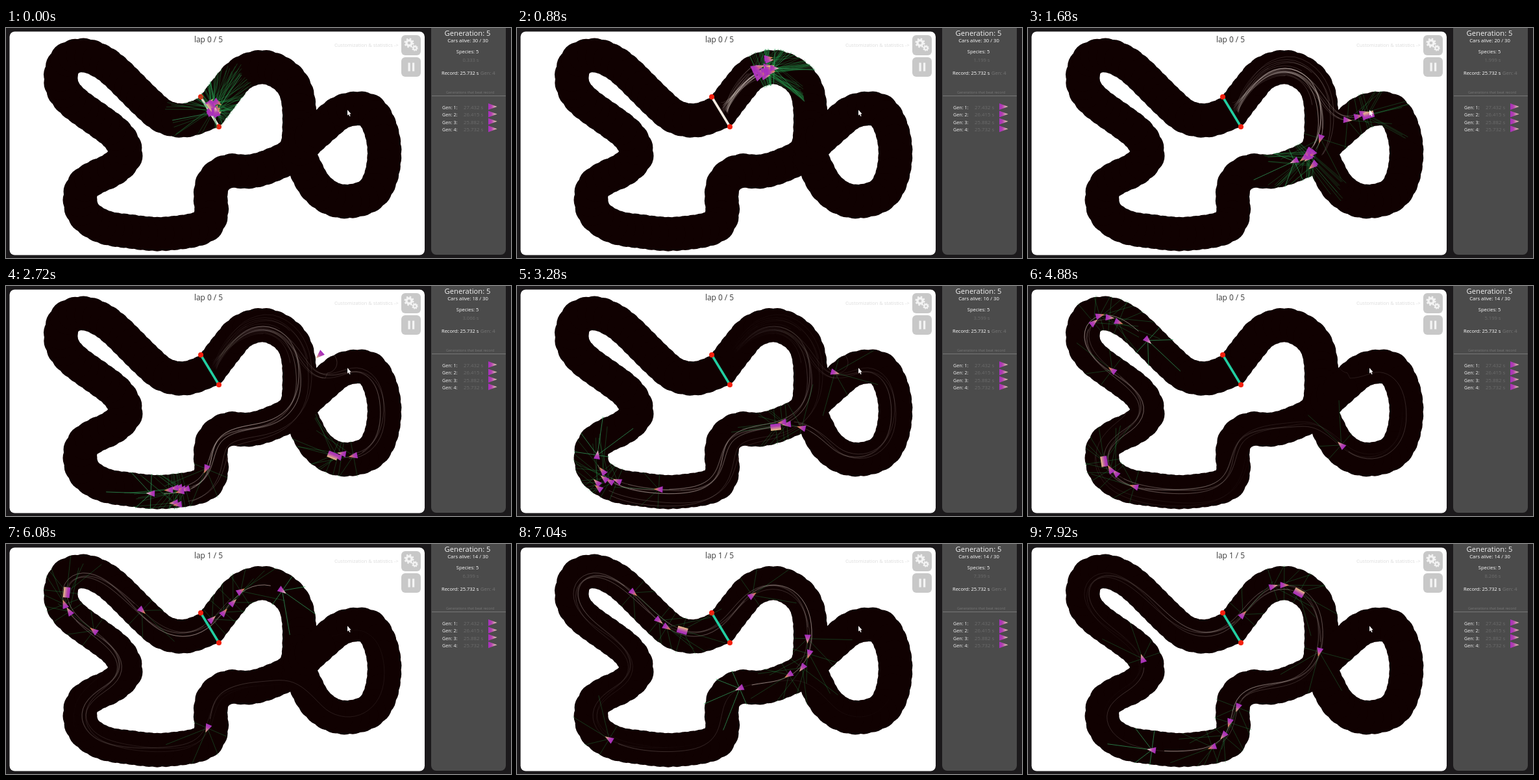
Recreate the animation shown at these times as an HTML page with a canvas. Size 778x354 px, loop 8 s.

```html
<!DOCTYPE html>
<html lang="en">
<head>
<meta charset="utf-8">
<title>Evolving cars</title>
<style>
html, body { margin: 0; width: 100%; height: 100%; overflow: hidden; background: #1b191b; }
canvas { display: block; }
</style>
</head>
<body>
<canvas id="stage" width="778" height="354"></canvas>
<script>
const g = document.getElementById('stage').getContext('2d');
const LOOP = 8000, STEP = 80, ROAD = 26, TAU = Math.PI * 2;
const LAP_TIME = 5070, TRAIL = 2800;
const rnd = n => { const v = Math.sin(n * 127.1 + 3.7) * 43758.5453; return v - Math.floor(v); };
const points = str => str.split(' ').map(p => p.split(',').map(Number));

// Road centre: the lap from the finish line, and the loop at the right
const lap = points('314,129 340,95 363,70 397,60 430,74 448,101 452,148 445,190 410,211 375,221 343,220 ' +
  '321,234 315,257 316,288 300,308 240,317 190,313 150,306 122,288 114,265 119,243 140,229 165,217 ' +
  '184,197 178,174 160,155 105,115 87,92 85,68 95,48 118,42 140,48 167,66 219,117 245,137 278,142');
const loop = points('490,150 515,130 540,124 562,129 577,155 583,190 578,228 563,255 535,266 505,264 ' +
  '478,245 461,215 452,188');

// Spline through p, resampled to one point per pixel
function spline(p) {
  const out = [];
  let len = 0, last = p[0];
  for (let i = 0; i < p.length - 1; i++) {
    const a = p[Math.max(0, i - 1)], b = p[i], c = p[i + 1], d = p[Math.min(p.length - 1, i + 2)];
    for (let t = 0; t < 1; t += 0.01) {
      const q = [0, 1].map(j => b[j] + 0.5 * t * (c[j] - a[j] + t * (2 * a[j] - 5 * b[j] + 4 * c[j] - d[j]
        + t * (3 * (b[j] - c[j]) + d[j] - a[j]))));
      len += Math.hypot(q[0] - last[0], q[1] - last[1]);
      last = q;
      while (out.length <= len) out.push(q);
    }
  }
  return out;
}
const clampAt = (p, i) => p[Math.max(0, Math.min(p.length - 1, Math.round(i)))];

// Averaging the road centre cuts the corners like a racing line
function racingLine(p, reach = 40) {
  return p.map((_, i) => {
    let x = 0, y = 0, n = 0;
    for (let k = -reach; k <= reach; k += 4, n++) {
      const q = clampAt(p, i + k);
      x += q[0];
      y += q[1];
    }
    return [x / n, y / n];
  });
}

const lapRoad = spline([...lap, lap[0]]);
const discs = [...lapRoad, ...spline([...loop, loop[0]])].filter((_, i) => i % 13 === 0);
const onRoad = (x, y) => discs.some(d => (d[0] - x) ** 2 + (d[1] - y) ** 2 < ROAD * ROAD);
const short = racingLine(spline([...lap, ...lap]));
const long = racingLine(spline([...lap.slice(0, 6), ...loop.slice(0, -1), ...lap.slice(8), ...lap]));

// speed 1 is the leader; a car that spins circles once on the spot
const SPIN = { from: 1680, span: 1650, r: 16 };
const cars = [
  ...[1, 0.95, 0.935, 0.92, 0.905, 0.81].map((speed, i) => ({ route: short, speed, lead: i === 0 })),
  ...[0.93, 0.915, 0.905, 0.87].map((speed, i) => ({ route: long, speed, box: i === 0 })),
  { route: long, speed: 0.8, spins: true }
];
for (let i = 0; i < 16; i++) {
  const early = i < 10;
  cars.push({
    route: early && i % 3 === 0 ? long : short,
    speed: early ? 0.75 + 0.2 * rnd(i) : 0.9 + 0.008 * (i - 10),
    off: early ? (rnd(i + 20) - 0.4) * 28 : i > 13 ? 19 : 0,
    death: early ? 900 + 75 * i : 2100 + 350 * (i - 10)
  });
}
cars.forEach((c, i) => { c.seed = i; c.off ??= 0; c.death ??= Infinity; });

function travelled(c, t) {
  if (c.spins) t -= Math.max(0, Math.min(SPIN.span, t - SPIN.from));
  const warm = 860;
  const run = t < warm ? t * t / (2 * warm) : t - warm / 2;
  return c.speed * lapRoad.length * run / LAP_TIME;
}

function pose(c, t) {
  const s = travelled(c, t), [x, y] = clampAt(c.route, s);
  const a = clampAt(c.route, s - 4), b = clampAt(c.route, s + 4);
  const settle = Math.max(0, 1 - t / 800);
  let dir = Math.atan2(b[1] - a[1], b[0] - a[0]);
  let side = (c.off + 4 * Math.sin(s / 70 + c.seed * 2)) * Math.min(1, s / 120), ahead = 0;
  const turn = (t - SPIN.from) / SPIN.span * TAU;
  const spinning = c.spins && turn > 0 && turn < TAU;
  if (spinning) {
    side -= SPIN.r * (1 - Math.cos(turn));
    ahead = SPIN.r * Math.sin(turn);
  }
  // side is positive to the left when heading left means downwards
  const left = spinning ? -side : side;
  const pos = {
    x: x + Math.sin(dir) * left + Math.cos(dir) * ahead + (rnd(c.seed + 60) - 0.5) * 13 * settle,
    y: y - Math.cos(dir) * left + Math.sin(dir) * ahead + (rnd(c.seed + 90) - 0.35) * 18 * settle
  };
  if (spinning) dir -= turn;
  return { ...pos, dir: dir + (rnd(c.seed + 120) - 0.5) * 3 * settle };
}

function round(x, y, w, h, r, color) {
  g.fillStyle = color;
  g.beginPath();
  g.roundRect(x, y, w, h, r);
  g.fill();
}
function dot(x, y, r, color) {
  g.fillStyle = color;
  g.beginPath();
  g.arc(x, y, r, 0, TAU);
  g.fill();
}
function seg(x1, y1, x2, y2, color, width) {
  g.strokeStyle = color;
  g.lineWidth = width;
  g.beginPath();
  g.moveTo(x1, y1);
  g.lineTo(x2, y2);
  g.stroke();
}
function text(str, x, y, size, color, align = 'center') {
  g.font = `${size}px "Open Sans", "Noto Sans", sans-serif`;
  g.fillStyle = color;
  g.textAlign = align;
  g.fillText(str, x, y);
}
function gear(x, y, r) {
  g.strokeStyle = '#f4f4f4';
  g.lineWidth = r * 0.55;
  g.beginPath();
  g.arc(x, y, r * 0.65, 0, TAU);
  g.stroke();
  g.lineWidth = r * 0.4;
  g.setLineDash([r * TAU / 16]);
  g.beginPath();
  g.arc(x, y, r, 0, TAU);
  g.stroke();
  g.setLineDash([]);
}

function drawBody(x, y, dir, box, tip) {
  g.save();
  g.translate(x, y);
  g.rotate(dir);
  const fill = box ? g.createLinearGradient(0, 5, 0, -5) : g.createLinearGradient(-6, 0, 7, 0);
  fill.addColorStop(0, '#a62cbe');
  fill.addColorStop(0.4, '#b345ac');
  fill.addColorStop(1, tip);
  g.fillStyle = fill;
  g.beginPath();
  if (box) g.rect(-8, -5, 16, 10);
  else {
    g.moveTo(-6, -5);
    g.lineTo(7.5, 0);
    g.lineTo(-6, 5);
  }
  g.fill();
  g.restore();
}

function drawTrail(c, t) {
  const end = Math.min(t - 60, c.death);
  let prev = null;
  for (let q = Math.max(0, Math.ceil((t - TRAIL) / 40) * 40); q <= end; q += 40) {
    const p = pose(c, q), alpha = (c.lead ? 0.65 : 0.26) * (1 - (t - q) / TRAIL);
    if (prev) seg(prev.x, prev.y, p.x, p.y, `rgba(255,240,232,${alpha})`, 0.8);
    prev = p;
  }
}

function drawRays(c, p) {
  const color = c.lead ? 'rgba(50,165,95,.9)' : 'rgba(35,150,75,.45)';
  for (let k = -2; k <= 2; k++) {
    const dx = Math.cos(p.dir + k * Math.PI / 4), dy = Math.sin(p.dir + k * Math.PI / 4);
    let r = 0;
    while (r < 68 && onRoad(p.x + dx * r, p.y + dy * r)) r += 3;
    seg(p.x, p.y, p.x + dx * r, p.y + dy * r, color, 0.8);
  }
}

function drawSidebar(t, alive) {
  round(655, -10, 115, 359, 8, '#4b4b4b');
  text('Generation: 5', 711, 12, 11.2, '#f4f4f4');
  text(`Cars alive: ${alive} / 30`, 711.5, 22, 7.7, '#fff');
  text('Species: 5', 711, 39, 7.5, '#fff');
  const clock = Math.round((t / 1000 + 0.33) * 15) / 15;
  text((Math.floor((clock - 1e-4) * 1000) / 1000).toFixed(3) + ' s', 716, 52, 7.6, '#6c6c6c');
  text('Record: 25.732 s', 671, 72, 7.5, '#fff', 'left');
  text('Gen: 4', 731, 72, 7.5, '#777', 'left');
  text('Generations that beat record', 715, 101, 5.5, '#777');
  seg(656, 104.5, 770, 104.5, '#777', 1);
  ['27.432', '26.415', '25.882', '25.732'].forEach((time, i) => {
    const y = 125 + i * 11.4;
    text(`Gen: ${i + 1}:`, 672, y, 7.2, '#f4f4f4', 'left');
    text(time + ' s', 705, y, 7.8, '#6c6c6c', 'left');
    drawBody(749, y - 4, 0, false, '#e9d9b4');
  });
}

function drawControls() {
  text('Customization & statistics ->', 506, 29, 7.5, '#dcdcdc', 'left');
  round(609, 11, 30, 31, 6, '#c8c8c8');
  gear(621, 23, 6.3);
  gear(630, 31, 4);
  round(609, 45, 30, 30, 6, '#c8c8c8');
  round(619.5, 53.5, 3.2, 13, 0, '#f4f4f4');
  round(626, 53.5, 3.2, 13, 0, '#f4f4f4');
}

function drawCursor() {
  g.fillStyle = '#fff';
  g.beginPath();
  for (const p of points('526,126 526,134.5 528,133 529.3,136 530.6,135.4 529.3,132.5 531.6,132.2')) g.lineTo(...p);
  g.fill();
}

function draw(t) {
  const alive = 30 - cars.filter(c => c.death <= t).length;
  round(0, 0, 778, 354, 0, '#1b191b');
  round(5.5, 5.5, 639.5, 344, 8, '#fff');
  discs.forEach(d => dot(d[0], d[1], ROAD + 0.5, '#100101'));

  cars.forEach(c => drawTrail(c, t));
  seg(300, 106, 328, 152, t < 1000 ? '#f6ece2' : '#22cfa2', 3.6);
  dot(300, 106, 4, '#f3200f');
  dot(328, 152, 4, '#f3200f');

  const running = cars.filter(c => t < c.death).reverse().map(c => [c, pose(c, t)]);
  running.forEach(([c, p]) => drawRays(c, p));
  running.forEach(([c, p]) =>
    drawBody(p.x, p.y, p.dir, c.box, c.lead ? '#f3e6cf' : c.seed % 2 ? '#e6a040' : '#e8c283'));

  const laps = Math.floor(travelled(cars[0], t) / lapRoad.length);
  text(`lap ${laps} / 5`, 312, 22, 11.9, '#3a3a3a');
  drawControls();
  drawSidebar(t, alive);
  drawCursor();
}

let shown = -1;
function tick() {
  const t = Math.floor(performance.now() % LOOP / STEP) * STEP;
  if (t !== shown) draw(shown = t);
  requestAnimationFrame(tick);
}
tick();
</script>
</body>
</html>
```
